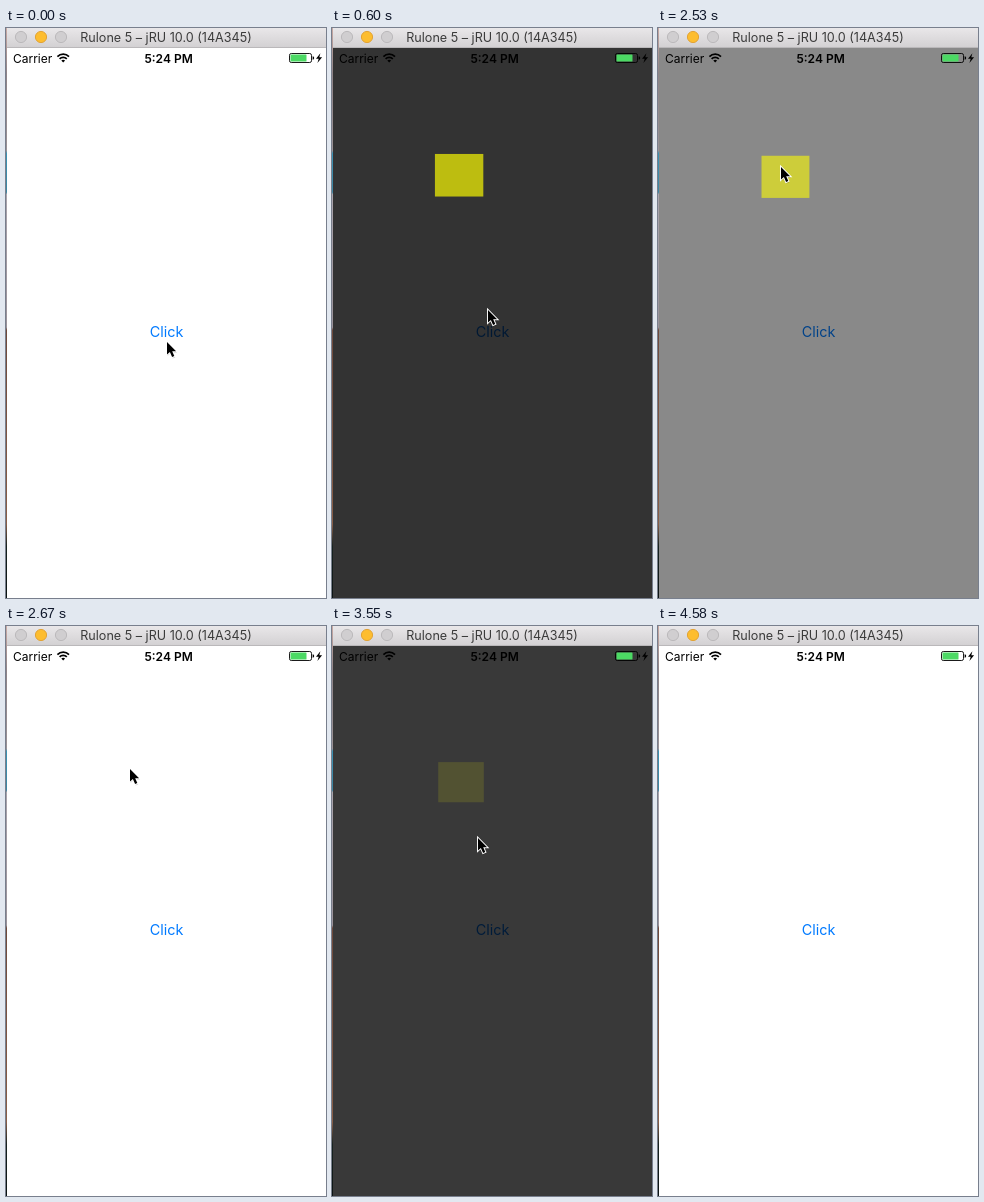
An HTML page that plays this animation: 320 by 570 pixels, repeating every 5.03 s.

```html
<!DOCTYPE html>
<html lang="en">
<head>
<meta charset="utf-8">
<title>Popup demo</title>
<style>
  html, body { margin: 0; width: 100%; height: 100%; overflow: hidden; background: #fff; }
  svg { display: block; width: 320px; height: 570px; font-family: Inter, "Open Sans", sans-serif; }
  text { text-anchor: middle; }
  .title { font-size: 12.6px; fill: #3b3b3b; }
  .status { font-size: 12px; }
  .clock { font-weight: 600; }
  .button { font-size: 14.4px; fill: #007aff; }
  .off { fill: #d0ced0; stroke: #bbb9bb; }
  .on { fill: #fdbd2f; stroke: #e2a335; }
  .wifi { fill: none; stroke: #000; stroke-width: 1.7; }
</style>
</head>
<body>
<svg viewBox="0 0 320 570">
  <defs>
    <linearGradient id="bar" x2="0" y2="1">
      <stop offset="0" stop-color="#e9e7e9"/>
      <stop offset="1" stop-color="#d2d0d2"/>
    </linearGradient>
    <linearGradient id="desk" x2="0" y2="1">
      <stop offset="0" stop-color="#c9aaa4"/>
      <stop offset=".08" stop-color="#8f8488"/>
      <stop offset=".215" stop-color="#9a9296"/>
      <stop offset=".22" stop-color="#3c93b4"/>
      <stop offset=".288" stop-color="#3f86a2"/>
      <stop offset=".292" stop-color="#a9a3ab"/>
      <stop offset=".525" stop-color="#9a929a"/>
      <stop offset=".53" stop-color="#6f4a3c"/>
      <stop offset=".87" stop-color="#8a5f48"/>
      <stop offset=".91" stop-color="#16221f"/>
      <stop offset="1" stop-color="#0c1413"/>
    </linearGradient>
  </defs>

  <rect width="320" height="570" fill="#fff"/>
  <text id="button" class="button" x="160.6" y="309.4">Click</text>
  <rect id="shade" x="1" y="20" width="319" height="550"/>
  <rect id="popup" x="101" y="120" width="50" height="44" fill="#ff0"/>

  <text class="status" x="26.6" y="34.5">Carrier</text>
  <g class="wifi">
    <path d="M51.4 28.6a8.2 8.2 0 0 1 11.6 0"/>
    <path d="M53.6 30.9a5 5 0 0 1 7.2 0"/>
    <path d="M57.2 34.6l-1.9-2a2.7 2.7 0 0 1 3.8 0z" fill="#000" stroke="none"/>
  </g>
  <text class="status clock" x="162.6" y="34.5">5:24 PM</text>
  <rect x="283.5" y="25.5" width="22" height="9" rx="1.8" fill="none" stroke="#000" stroke-width=".9"/>
  <rect x="284.5" y="26.5" width="16" height="7" rx=".6" fill="#4cd964"/>
  <path d="M306.6 28.2q1.6.3 1.6 1.8t-1.6 1.8z"/>
  <path d="M314.4 25.2L310 30.7h2.7l-1.3 4.3 4.7-5.8h-2.8z"/>

  <rect width="320" height="20" fill="url(#bar)"/>
  <rect y="19" width="320" height="1" fill="#bab8ba"/>
  <circle class="off" cx="15" cy="9" r="5.6"/>
  <circle class="on" cx="35" cy="9" r="5.6"/>
  <circle class="off" cx="55" cy="9" r="5.6"/>
  <text class="title" x="160" y="14">Rulone 5 – jRU 10.0 (14A345)</text>
  <rect width="1" height="570" fill="url(#desk)"/>

  <g id="cursor">
    <path d="M1.5 3v13l2.9-2.5 2.3 5 2.6-1.1-2.1-4.7h4z" opacity=".18"/>
    <path d="M1 2v12.6l2.9-2.7 2.2 5 2.2-.9-2.1-4.8h3.9z"
          stroke="#fff" stroke-width="1.9" paint-order="stroke"/>
  </g>
</svg>
<script>
  const LOOP = 5030, FADE = 250;

  // Each redraw: time, cursor x, cursor y
  const ticks = [
    [0, 160, 312], [150, 160, 306], [300, 160, 300], [450, 159, 297],
    [600, 155, 280], [750, 146, 215], [900, 133, 160], [1040, 124, 140],
    [1190, 120, 128], [1340, 120, 126], [1480, 120, 130], [1630, 122, 137],
    [2530, 122, 137], [2670, 123, 141], [2820, 133, 190], [2970, 150, 262],
    [3110, 160, 296], [3260, 160, 298], [3400, 159, 294], [3550, 145, 210],
    [3700, 128, 155], [3850, 122, 142], [3990, 121, 139], [4140, 121, 138],
    [4290, 126, 146], [4430, 303, 449], [4580, -40, 0]
  ];
  const opens = [275, 3325], closes = [2418, 4205];
  const POPUP_DELAY = 170;

  const el = id => document.getElementById(id);
  const button = el('button'), shade = el('shade'), popup = el('popup'), cursor = el('cursor');

  const ease = (t, start) => {
    const p = Math.min(1, Math.max(0, (t - start) / FADE));
    return p * p * (3 - 2 * p);
  };
  const shown = (t, delay) => opens.reduce(
    (sum, start, i) => sum + ease(t, start + delay) - ease(t, closes[i]), 0);

  function draw(now) {
    const time = now % LOOP;
    const [t, x, y] = ticks.findLast(k => k[0] <= time);
    const p = shown(t, POPUP_DELAY), scale = .9 + .1 * p;
    const pressed = t === 300 || t === 3260;
    const dimmed = t >= 900 && t < 2530;

    shade.setAttribute('opacity', .8 * shown(t, 0));
    popup.setAttribute('opacity', p);
    popup.setAttribute('transform', `translate(160.5 304) scale(${scale}) translate(-160.5 -304)`);
    button.setAttribute('opacity', pressed ? .2 : dimmed ? .6 : 1);
    cursor.setAttribute('transform', `translate(${x} ${y})`);
  }

  const begin = performance.now();
  function frame() {
    draw(performance.now() - begin);
    requestAnimationFrame(frame);
  }
  frame();
</script>
</body>
</html>
```
